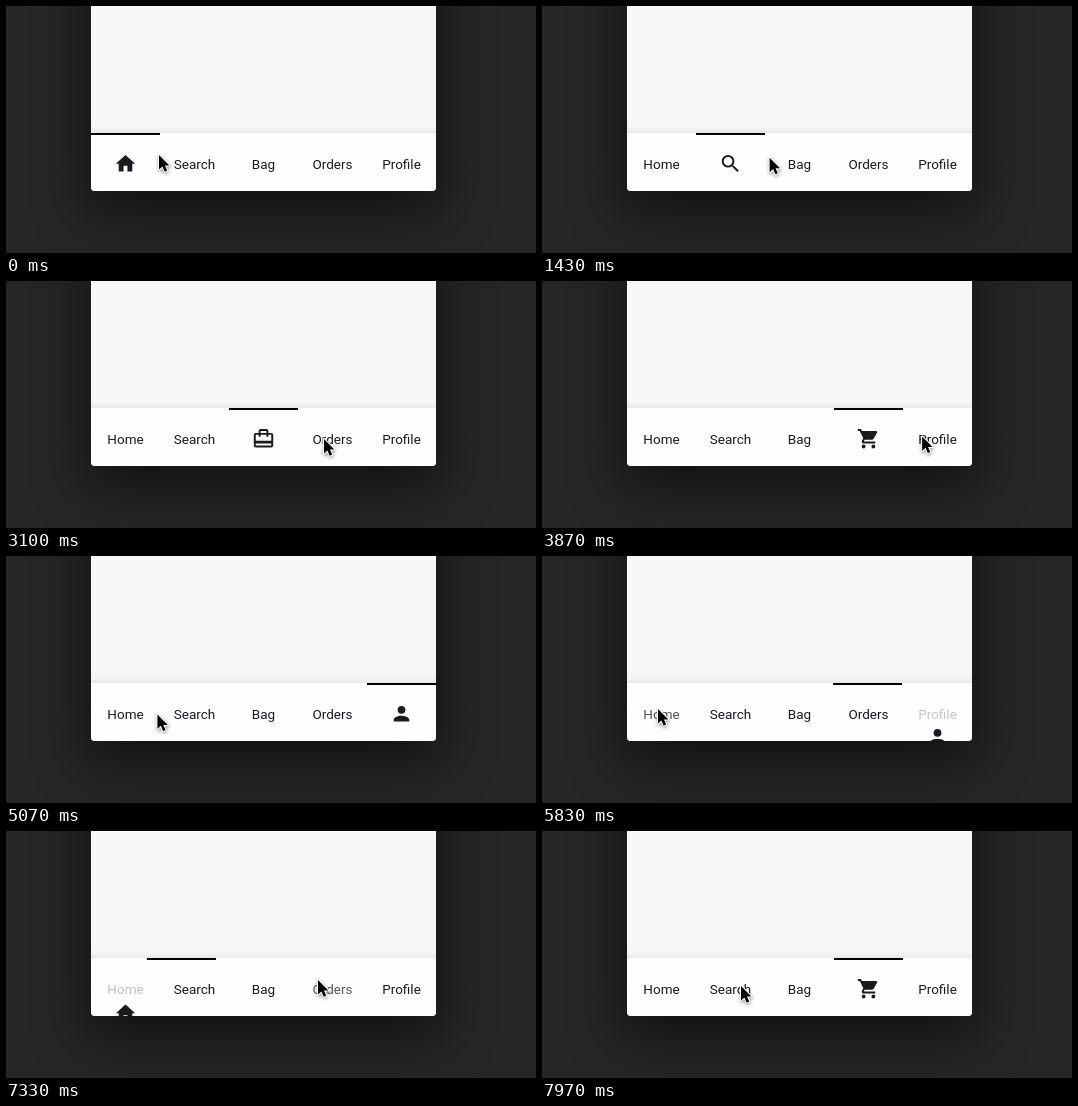
Write an HTML page with a canvas that moves like this. It is 530x247 px and loops after 8 s.

```html
<!DOCTYPE html>
<html lang="en">
<head>
<meta charset="utf-8">
<title>Bottom navigation</title>
<style>
  html, body { margin: 0; width: 100%; height: 100%; overflow: hidden; background: #272528; }
  canvas { display: block; width: 530px; height: 247px; }
</style>
</head>
<body>
<canvas id="stage"></canvas>
<script>
const W = 530, H = 247, LOOP = 8000;
const BAR = { x: 85, y: 127, w: 345, h: 58 };
const CELL = BAR.w / 5, MID_Y = 157.7;
const ICON_SCALE = 0.97, ICON_DROP = 91, SWITCH_MS = 300;
const INK = '#1b1a1e';

const canvas = document.getElementById('stage');
const ctx = canvas.getContext('2d');
const dpr = window.devicePixelRatio || 1;
canvas.width = W * dpr;
canvas.height = H * dpr;

const tabs = [
  ['Home', 'M10 20v-6h4v6h5v-8h3L12 3 2 12h3v8z'],
  ['Search', 'M9.5 3a6.5 6.5 0 1 0 0 13a6.5 6.5 0 1 0 0-13zm0 2a4.5 4.5 0 1 1 0 9a4.5 4.5 0 1 1 0-9z' +
    'M13.3 14.8l.7.7 5 5 1.5-1.5-5-5h-.8l-.7-.7z'],
  ['Bag', 'M20 6h-3V4q0-2-2-2H9Q7 2 7 4v2H4Q2 6 2 8v11q0 2 2 2h16q2 0 2-2V8q0-2-2-2z' +
    'M9 4h6v2H9zM4 17h16v2H4zM4 8h3v2h2V8h6v2h2V8h3v6H4z'],
  ['Orders', 'M1 2v2h2l3.6 7.6-1.35 2.4C4.5 15.4 5.5 17 7 17h12v-2H7.4q-.4-.1-.2-.4l.9-1.6h7.45' +
    'q1.2 0 1.75-1l3.58-6.5Q21.5 4.2 20 4H5.2l-.94-2z' +
    'M7 18a2 2 0 1 0 0 4a2 2 0 1 0 0-4zM17 18a2 2 0 1 0 0 4a2 2 0 1 0 0-4z'],
  ['Profile', 'M12 4a4 4 0 1 0 0 8a4 4 0 1 0 0-8zM12 14c-2.67 0-8 1.34-8 4v2h16v-2c0-2.66-5.33-4-8-4z']
].map(([label, d], i) => ({ label, icon: new Path2D(d), x: BAR.x + CELL * (i + 0.5) }));

// [time, tab]
const taps = [[950, 1], [2180, 2], [3480, 3], [4480, 4], [5755, 0], [7250, 3]];

// [start, end, x, y, bend]: eased pointer moves to x, y
const moves = [
  [245, 400, 177, 151, 0],
  [1306, 1730, 255, 152, 0],
  [2483, 3000, 315, 158, 2],
  [3010, 3100, 318, 158, 0],
  [3672, 4070, 389, 155, 0],
  [4840, 5300, 118, 153, 12],
  [5310, 5370, 116, 153, 0],
  [6222, 6770, 312, 149, 4],
  [7570, 7990, 199, 155, 0]
];
const pointer = new Path2D('M0 0V14.6L3.4 11.4 5.7 16.7 8.2 15.6 5.9 10.5H10.4Z');

const clamp = v => Math.min(1, Math.max(0, v));
const easeOut = p => 1 - (1 - p) ** 3;

function selection(t) {
  let from = 0, to = 0, p = 1;
  for (const [at, tab] of taps) {
    if (t < at) break;
    from = to;
    to = tab;
    p = clamp((t - at) / SWITCH_MS);
  }
  return { from, to, p };
}

function pointerAt(t) {
  let x = 153, y = 149;
  for (const [start, end, toX, toY, bend] of moves) {
    if (t < start) break;
    const e = easeOut(clamp((t - start) / (end - start)));
    x += (toX - x) * e;
    y += (toY - y) * e + 4 * bend * e * (1 - e);
  }
  return [x, y];
}

function setShadow(color, blur, dy, dx = 0) {
  ctx.shadowColor = color;
  ctx.shadowBlur = blur * dpr;
  ctx.shadowOffsetX = dx * dpr;
  ctx.shadowOffsetY = dy * dpr;
}

function drawCard() {
  ctx.fillStyle = '#272528';
  ctx.fillRect(0, 0, W, H);

  ctx.save();
  setShadow('rgba(0,0,0,.62)', 54, 17);
  ctx.fillStyle = '#f7f6f9';
  ctx.beginPath();
  ctx.roundRect(BAR.x, -300, BAR.w, 300 + BAR.y + BAR.h, 4);
  ctx.fill();
  ctx.restore();

  ctx.save();
  ctx.beginPath();
  ctx.roundRect(BAR.x, -300, BAR.w, 300 + BAR.y + BAR.h, 4);
  ctx.clip();
  setShadow('rgba(0,0,0,.13)', 8, 0);
  ctx.fillStyle = '#fefdff';
  ctx.fillRect(BAR.x - 20, BAR.y, BAR.w + 40, BAR.h + 20);
  ctx.restore();
}

function drawTab(tab, active) {
  ctx.fillStyle = INK;
  ctx.globalAlpha = 1 - active;
  ctx.fillText(tab.label, tab.x, MID_Y + 5.2);
  ctx.globalAlpha = 1;
  if (!active) return;
  ctx.save();
  ctx.translate(tab.x, MID_Y + ICON_DROP * (1 - active));
  ctx.scale(ICON_SCALE, ICON_SCALE);
  ctx.translate(-12, -12);
  ctx.fill(tab.icon, tab.label === 'Bag' ? 'evenodd' : 'nonzero');
  ctx.restore();
}

function drawBar(t) {
  const { from, to, p } = selection(t);
  ctx.save();
  ctx.beginPath();
  ctx.rect(BAR.x, BAR.y, BAR.w, BAR.h);
  ctx.clip();
  ctx.font = '400 13.5px Roboto, sans-serif';
  ctx.textAlign = 'center';
  tabs.forEach((tab, i) => drawTab(tab, i === to ? p : i === from ? 1 - p : 0));
  ctx.fillStyle = '#000';
  ctx.fillRect(BAR.x + CELL * (from + (to - from) * p), BAR.y, CELL, 2);
  ctx.restore();
}

function drawPointer(t) {
  ctx.save();
  ctx.translate(...pointerAt(t));
  ctx.lineWidth = 2;
  ctx.lineJoin = 'round';
  ctx.strokeStyle = '#fff';
  setShadow('rgba(0,0,0,.45)', 3.5, 1.2, 0.3);
  ctx.stroke(pointer);
  setShadow('transparent', 0, 0);
  ctx.fillStyle = '#000';
  ctx.fill(pointer);
  ctx.restore();
}

function frame(now) {
  const t = now % LOOP;
  ctx.setTransform(dpr, 0, 0, dpr, 0, 0);
  drawCard();
  drawBar(t);
  drawPointer(t);
  requestAnimationFrame(frame);
}
frame(0);
</script>
</body>
</html>
```
